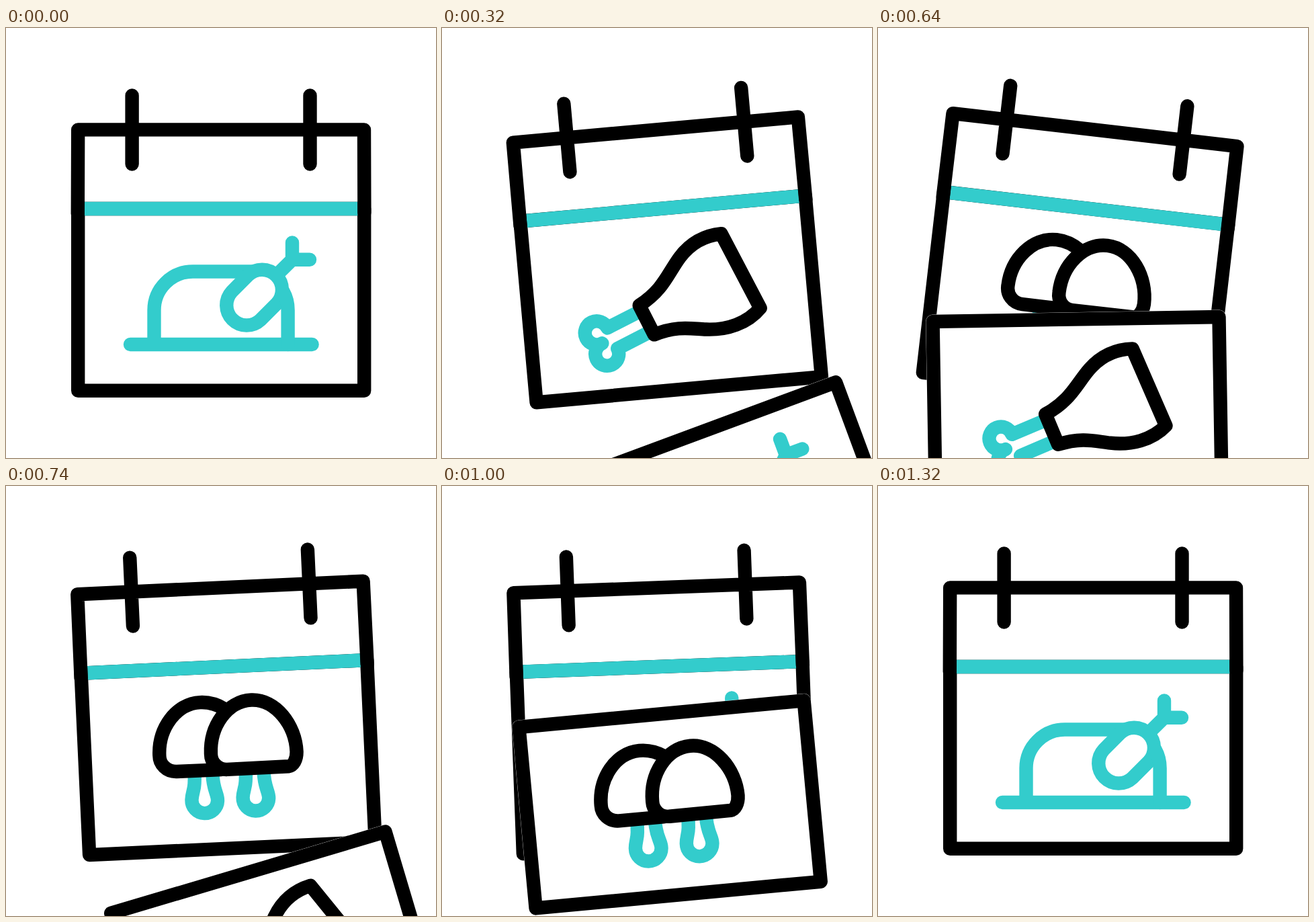
These frames come from a looping animation (640 px wide and 640 px high, 2.4 s). An HTML page:

```html
<!DOCTYPE html>
<html lang="en">
<head>
<meta charset="utf-8">
<title>Holiday calendar</title>
<style>
  html, body { margin: 0; width: 100%; height: 100%; overflow: hidden; background: #fff; }
  svg { display: block; width: 100vw; height: 100vh; }
  .ink, .teal { fill: none; stroke: #000; stroke-width: 20.4; stroke-linecap: round; stroke-linejoin: round; }
  .teal { stroke: #33cccc; }
  .white { fill: #fff; }
  .sheet { fill: #fff; stroke: #fff; stroke-width: 20.9; stroke-linejoin: round; }
</style>
</head>
<body>
<svg viewBox="0 0 640 640">
  <defs>
    <g id="frame">
      <rect class="sheet" x="107.2" y="269" width="426" height="270.7"/>
      <rect class="ink" x="107.2" y="269" width="426" height="270.7"/>
    </g>
    <path id="stem" class="teal" d="M289 431V444C289 454 285.7 459 285.7 468.5A19.3 19.3 0 0 0 324.3 468.5C324.3 458 317 453 315.5 429"/>
  </defs>
  <g id="calendar">
    <g class="page">
      <use href="#frame"/>
      <g class="teal">
        <path d="M185 471H455.6M220.5 471V420A57.5 57.5 0 0 1 278 362.5H368"/>
        <path d="M403 367.5L426 344.8M426 319.4V344.8H452"/>
        <path class="white" d="M360.5 367.8A30 30 0 0 1 402.9 410.2L378.7 434.5A30 30 0 0 1 336.3 392.1Z"/>
        <path d="M419.6 471V420C419.6 409 417 400 412.5 392"/>
      </g>
    </g>
    <g class="page">
      <use href="#frame"/>
      <g transform="translate(0 -2.5) rotate(-5.8 320 176.5)">
        <path class="teal" d="M246 415.5L196 430A17.5 17.5 0 1 0 184 451A17.5 17.5 0 1 0 205 463L258 447.5"/>
        <path class="ink white" d="M249 406C289 390 300 367 322 347C341 330 362 322 389 324.5L425 444C402 463 370 467 340 460C318 455 300 446 262.5 453Z"/>
      </g>
    </g>
    <g class="page">
      <use href="#frame"/>
      <g transform="rotate(4.45 320 176.5)">
        <use href="#stem"/>
        <use href="#stem" x="76" y="-6"/>
        <path class="ink white" d="M328 422L262 427C247 428 236 417 235.5 404C232.5 364 257.5 325.8 293.5 323C306 322 319 325 331 332"/>
        <path class="ink white" d="M337 421.5L428 414C435 413 440 404 439.5 392C436.6 352 405.5 314.2 369.5 317C333.5 319.8 309 358 312 399C312.5 412 323 422.5 337 421.5Z"/>
      </g>
    </g>
    <g id="header">
      <path class="teal" style="stroke-linecap:butt" d="M117 269H523.5"/>
      <path class="ink" d="M106.8 276.5L107.2 151.4H533L533.4 275M187.6 100.5V202.5M452.5 100.5V202.5"/>
    </g>
  </g>
</svg>
<script>
const LOOP = 2400, STEP = 20, FALL = 440;
const calendar = document.getElementById('calendar');
const header = document.getElementById('header');
const pages = [...document.querySelectorAll('.page')];

// [time, degrees]
const swing = [[0, 0], [278, -6.15], [560, 10.7], [800, -5.1], [1160, 0]];

const smooth = u => u * u * (3 - 2 * u);

function tilt(t) {
  for (let i = 1; i < swing.length; i++) {
    const [t0, a0] = swing[i - 1], [t1, a1] = swing[i];
    if (t < t1) return a0 + (a1 - a0) * smooth((t - t0) / (t1 - t0));
  }
  return 0;
}

function bezier(x1, y1, x2, y2) {
  const at = (s, a, b) => 3 * (1 - s) * (1 - s) * s * a + 3 * (1 - s) * s * s * b + s * s * s;
  return x => {
    let lo = 0, hi = 1;
    for (let i = 0; i < 24; i++) {
      const mid = (lo + hi) / 2;
      if (at(mid, x1, x2) < x) lo = mid; else hi = mid;
    }
    return at(lo, y1, y2);
  };
}
const drop = bezier(0.328, 0, 0.765, 0.885);

function pose(p) {
  const x = 48 * p + 20 * p * p + 52 * p * p * p;
  return `translate(${x} ${465 * p}) rotate(${-21.3 * p} 320 404.4)`;
}

let shown = '';
function stack(order) {
  const key = order.join();
  if (key === shown) return;
  shown = key;
  pages.forEach(p => p.style.display = 'none');
  for (const i of order) {
    pages[i].style.display = '';
    calendar.insertBefore(pages[i], header);
  }
}

function draw(t) {
  calendar.setAttribute('transform', `rotate(${tilt(t)} 320 176.5)`);
  const turn = Math.min(3, Math.floor(t / FALL));
  const top = turn % 3, next = (top + 1) % 3;
  const local = t - turn * FALL;
  pages.forEach(p => p.removeAttribute('transform'));
  if (turn === 3) return stack([0]);
  if (local === 0 && turn > 0) {
    // the previous page is just leaving the stage
    pages[turn - 1].setAttribute('transform', pose(1));
    return stack([top, turn - 1]);
  }
  if (local > 0) pages[top].setAttribute('transform', pose(drop(local / FALL)));
  stack(local > 0 ? [next, top] : [top]);
}

const start = performance.now();
function tick() {
  const t = (performance.now() - start) % LOOP;
  draw(Math.floor(t / STEP) * STEP);
  requestAnimationFrame(tick);
}
tick();
</script>
</body>
</html>
```
